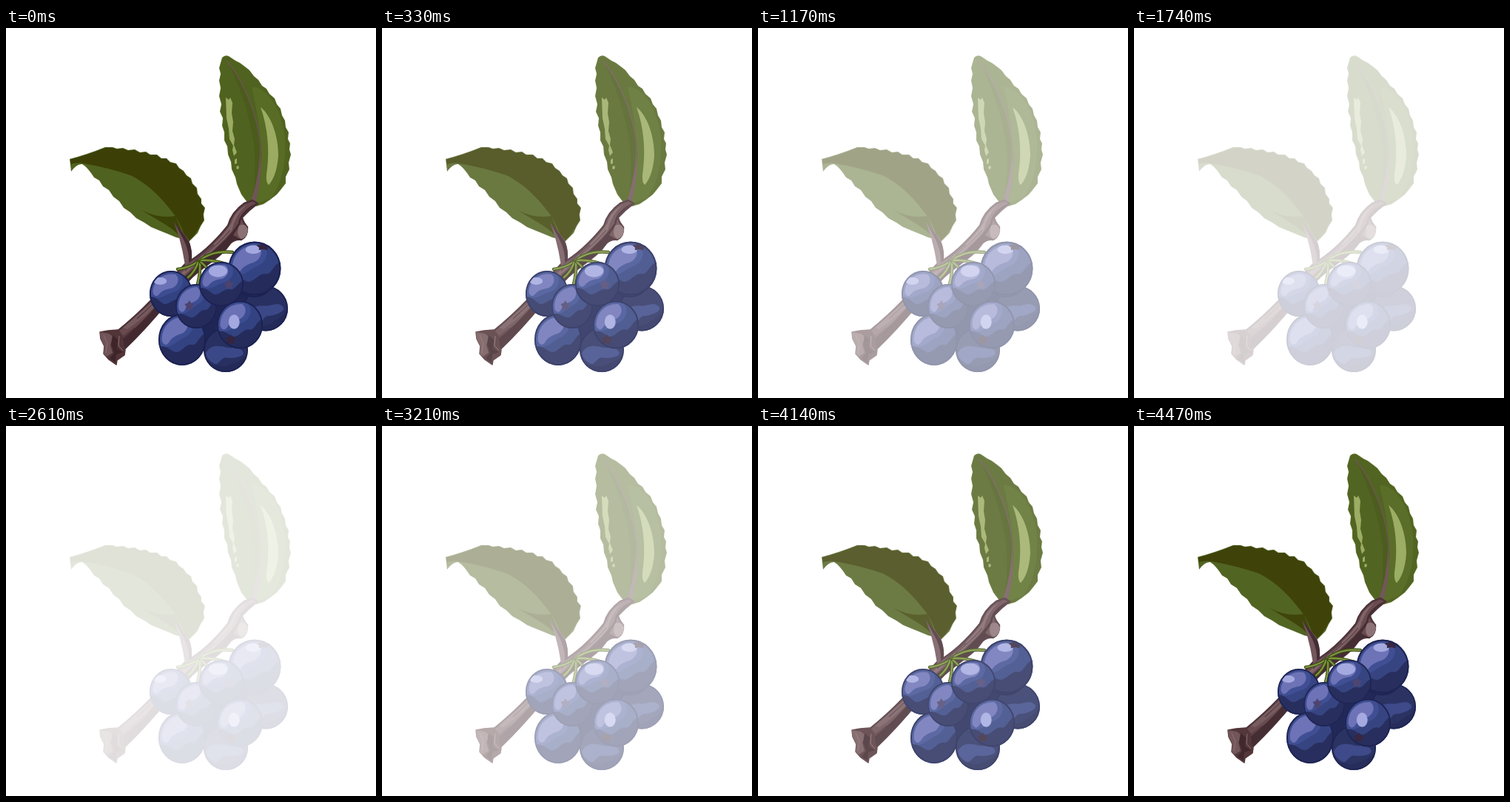
Write an HTML page that moves like this. It is 500 px wide and 500 px high and loops after 4.5 s.

```html
<!DOCTYPE html>
<html lang="en">
<head>
<meta charset="utf-8">
<title>Berry branch</title>
<style>
  html, body { margin: 0; width: 100%; height: 100%; overflow: hidden; background: #fff; }
  svg { display: block; width: 100%; height: 100%; }
</style>
</head>
<body>
<svg viewBox="0 0 500 500">
  <defs>
    <clipPath id="round"><circle r="1"/></clipPath>
    <path id="leftShape" d="M86 177Q109 171 134 161L144 161 150 163 158 162 165 165 174 164 181 168 189 167 195 171 204 171 210 176 217 176 222 181 230 183 234 189 240 193 244 199 250 203 252 210 258 216 259 224 264 231 264 237 269 243 267 252 268 260 263 268 259 277 252 284 247 289 238 285 230 283 218 278 208 274 196 269 187 263 176 257 168 249 159 243 153 234 145 228 139 219 131 214 126 206 119 202Q110 188 103 184 96 183 88 194Z"/>
    <path id="rightShape" d="M292 40Q296 36 301 38L310 44 316 47 324 53 329 57 335 65 341 70 346 78 352 82 356 89 363 95 366 103 371 109 373 118 377 125 378 134 382 141 381 150 384 156 383 164 385 171 382 182 383 191 378 201 378 210 371 219 366 225 357 232 348 238 338 241 329 239 324 233 318 225 312 211 310 202 305 191 304 181 300 171 299 160 295 152 295 141 292 132 293 122 289 113 291 103 288 92 290 81 288 71 290 62 288 54Z"/>
    <clipPath id="leftClip"><use href="#leftShape"/></clipPath>
    <clipPath id="rightClip"><use href="#rightShape"/></clipPath>
  </defs>
  <g id="plant">
    <g id="leftLeaf" clip-path="url(#leftClip)">
      <use href="#leftShape" fill="#50621f"/>
      <path fill="#3c4006" d="M80 178L134 150 240 160 280 240 245 295C242 280 236 265 228 253C208 226 190 210 168 199Q135 188 104 183Q98 181 88 184Z"/>
      <path fill="#3c4307" d="M183 246Q206 258 229 254L245 292Q232 276 216 266Z"/>
      <use href="#leftShape" fill="none" stroke="#55682a" stroke-width="1.6"/>
    </g>
    <g id="rightLeaf" clip-path="url(#rightClip)">
      <use href="#rightShape" fill="#50621f"/>
      <path fill="#4b5b1c" d="M299 44C322 73 337 110 344 150C347 178 342 211 332 238Q338 205 336 165C330 115 314 75 299 44Z"/>
      <path fill="#586c26" d="M332 80C352 78 374 110 377 150Q380 200 358 230L334 238C343 211 348 178 344 150Q340 112 332 80Z"/>
      <path fill="#9bac62" d="M344 107C358 118 368 145 368 172Q366 200 355 212Q350 208 353 190C356 165 354 135 344 107Z"/>
      <path fill="#9bac62" d="M297 94L301 97 303 94 306 101 305 115 307 127 306 139 309 150 308 158 312 168 308 173 306 165 307 159 302 150 301 136 298 122Z"/>
      <path fill="#9bac62" d="M309 178L312 176 312 183 309 184ZM312 186L315 187 314 191 311 190Z"/>
      <path fill="none" stroke="#6c5450" stroke-width="1.6" d="M299 45C323 75 338 115 343 150C346 176 341 205 332 236"/>
      <path fill="#705557" d="M344 170Q347 201 336 240L329 239Q341 208 344 170Z"/>
      <use href="#rightShape" fill="none" stroke="#5b6f27" stroke-width="1.6"/>
    </g>
    <g id="branch">
      <path fill="#67494e" stroke="#4b3037" stroke-width="2.4" stroke-linejoin="round" d="M333 233L340 237Q328 246 319 256 320 262 326 269 327 281 318 286 309 285 303 291C291 309 276 315 253 335L216 373Q189 406 160 434L149 411Q176 389 196 368L242 319Q272 302 300 267C304 253 312 244 322 237Z"/>
      <path fill="#432a31" d="M332 240Q315 251 314 264 304 279 291 291C270 312 255 323 235 342L207 371Q181 402 157 420L160 434Q195 401 216 373L253 335C276 315 291 309 303 291Q309 285 318 286L307 280 316 266Q318 251 339 237Z"/>
      <path fill="#7e6467" d="M325 239Q308 249 305 263C292 284 272 301 252 316L201 368 174 391Q207 369 231 344C255 318 284 300 305 274Q310 252 325 239Z"/>
      <path fill="#8b7174" d="M315 267Q324 263 327 273 326 283 318 285 310 280 315 267Z"/>
      <path fill="#755a5e" d="M164 407Q190 390 212 365L203 366 158 405Z"/>
      <path fill="none" stroke="#50343b" stroke-width="1.1" d="M303 273Q289 290 267 307M281 293Q260 309 242 328M228 342Q202 371 177 393M174 405L157 418"/>
      <path fill="#513438" stroke="#513438" stroke-width="1.5" stroke-linejoin="round" d="M127 411L138 409 151 408 158 417 156 424 161 435 160 442 150 449 149 455 139 448 132 440 133 430 128 420Z"/>
      <path fill="#705457" d="M127 411L139 413 146 418 141 428 144 439 136 444 132 440 133 430 128 420Z"/>
      <path fill="#3d252a" d="M144 415L151 421 150 433 158 438 149 441 148 452 140 447 146 439 142 427Z"/>
      <path fill="none" stroke="#8b6d6d" d="M132 415L137 426 135 439M153 416L152 429 158 436"/>
      <path fill="#70545a" d="M227 262Q236 273 246 285 252 298 251 314L242 321Q239 301 234 283Z"/>
      <path fill="#432a31" d="M227 262Q242 280 248 290 252 301 251 314L247 317Q248 303 241 288Z"/>
    </g>
    <g id="stems" fill="none" stroke-linecap="round"></g>
    <path fill="#1f2656" d="M240 365L292 340 340 350 340 390 300 430 263 420Z"/>
    <g id="berries"></g>
  </g>
</svg>
<script>
  const LOOP = 4500, FAINTEST = 0.12;
  const plant = document.getElementById('plant');

  const stemPaths = [
    'M259 316Q278 300 306 303', 'M259 316Q247 324 232 326', 'M260 316Q255 330 246 337',
    'M262 316Q263 331 259 346', 'M263 316Q268 320 273 326', 'M264 314Q280 313 298 319'
  ];
  const stroke = (d, color, width) => `<path d="${d}" stroke="${color}" stroke-width="${width}"/>`;
  document.getElementById('stems').innerHTML = stemPaths.map(d =>
    stroke(d, '#344310', 4.4) + stroke(d, '#6d8430', 2.6) + stroke(d, '#90a54b', 0.8)).join('');

  // Berries listed back to front; glint and calyx are [x, y, rx, ry] in berry units.
  const berries = [
    { x: 238, y: 421, rx: 32, ry: 35, turn: 0 },
    { x: 351, y: 379, rx: 30, ry: 30.5, turn: -12, dim: true },
    { x: 297, y: 435, rx: 30, ry: 30, turn: 0, dim: true },
    { x: 335, y: 333, rx: 30, ry: 31, turn: 0, dim: true },
    { x: 223, y: 359, rx: 29, ry: 31, turn: 8, glint: [-0.5, -0.55, 0.3, 0.16] },
    { x: 336, y: 325, rx: 35.5, ry: 36.5, turn: 0, glint: [-0.05, -0.7, 0.3, 0.16], calyx: [0.33, -0.81, 0.28, 0.16] },
    { x: 257, y: 376, rx: 28, ry: 30, turn: -5, calyx: [-0.33, -0.02, 0.24, 0.25], soft: true },
    { x: 291, y: 346, rx: 30, ry: 30, turn: 6, glint: [-0.15, -0.58, 0.42, 0.27], calyx: [0.34, 0.03, 0.24, 0.24], soft: true },
    { x: 316, y: 401, rx: 31, ry: 32.5, turn: 0, glint: [-0.25, -0.12, 0.24, 0.3], calyx: [-0.4, 0.63, 0.27, 0.22] }
  ];

  const ellipse = ([x, y, rx, ry], color) =>
    `<ellipse cx="${x}" cy="${y}" rx="${rx}" ry="${ry}" fill="${color}"/>`;

  function star([cx, cy, rx, ry], color) {
    const points = Array.from({ length: 10 }, (_, i) => {
      const r = i % 2 ? 0.62 : 1, a = i * Math.PI / 5 - Math.PI / 2;
      return `${cx + rx * r * Math.cos(a)},${cy + ry * r * Math.sin(a)}`;
    });
    return `<polygon points="${points.join(' ')}" fill="${color}"/>`;
  }

  const brightSkin = `
    <path fill="#3d4d92" d="M-1 .25C-.95-.6-.4-1 .25-.95C.65-.7.45-.2.1-.08S-.45.4-1 .25Z"/>
    <path fill="#6b71b5" d="M-.85.05C-.88-.5-.45-.88.1-.86C.38-.66.22-.3-.05-.22S-.45-.05-.55.1-.78.22-.85.05Z"/>
    <path fill="#252c5c" d="M-1.1.35C-.75.12-.55.4-.3.48S.15.15.4.2.7-.15 1-.25V1.2H-1Z"/>`;
  const dimSkin = `
    <path fill="#3b4888" d="M-.9.15C-.7-.25-.3-.2 0-.12S.55-.2.75.05 .35.4.05.35-.3.75-.55.6-.85.35-.9.15Z"/>
    <path fill="#232a58" d="M-1 .7C-.5.55-.2.85.1.7S.6.6.95.2V1.2H-.8Z"/>`;

  function berry({ x, y, rx, ry, turn, dim, glint, calyx, soft }) {
    return `<g transform="translate(${x} ${y}) scale(${rx} ${ry})">
      <g clip-path="url(#round)">
        <circle r="1" fill="${dim ? '#283061' : '#334281'}"/>
        <g transform="rotate(${turn})">${dim ? dimSkin : brightSkin}</g>
        ${glint ? ellipse(glint, '#a3a8e0') : ''}
        ${calyx ? star(calyx, soft ? '#4b4370' : '#33243f') : ''}
      </g>
      <circle r=".97" fill="none" stroke="#1b2252" stroke-width=".06"/>
    </g>`;
  }
  document.getElementById('berries').innerHTML = berries.map(berry).join('');

  function draw(ms) {
    const fade = Math.abs(1 - 2 * (ms % LOOP) / LOOP);
    plant.setAttribute('opacity', Math.max(FAINTEST, fade));
  }

  const start = performance.now();
  function tick() {
    draw(performance.now() - start);
    requestAnimationFrame(tick);
  }
  draw(0);
  requestAnimationFrame(tick);
</script>
</body>
</html>
```
